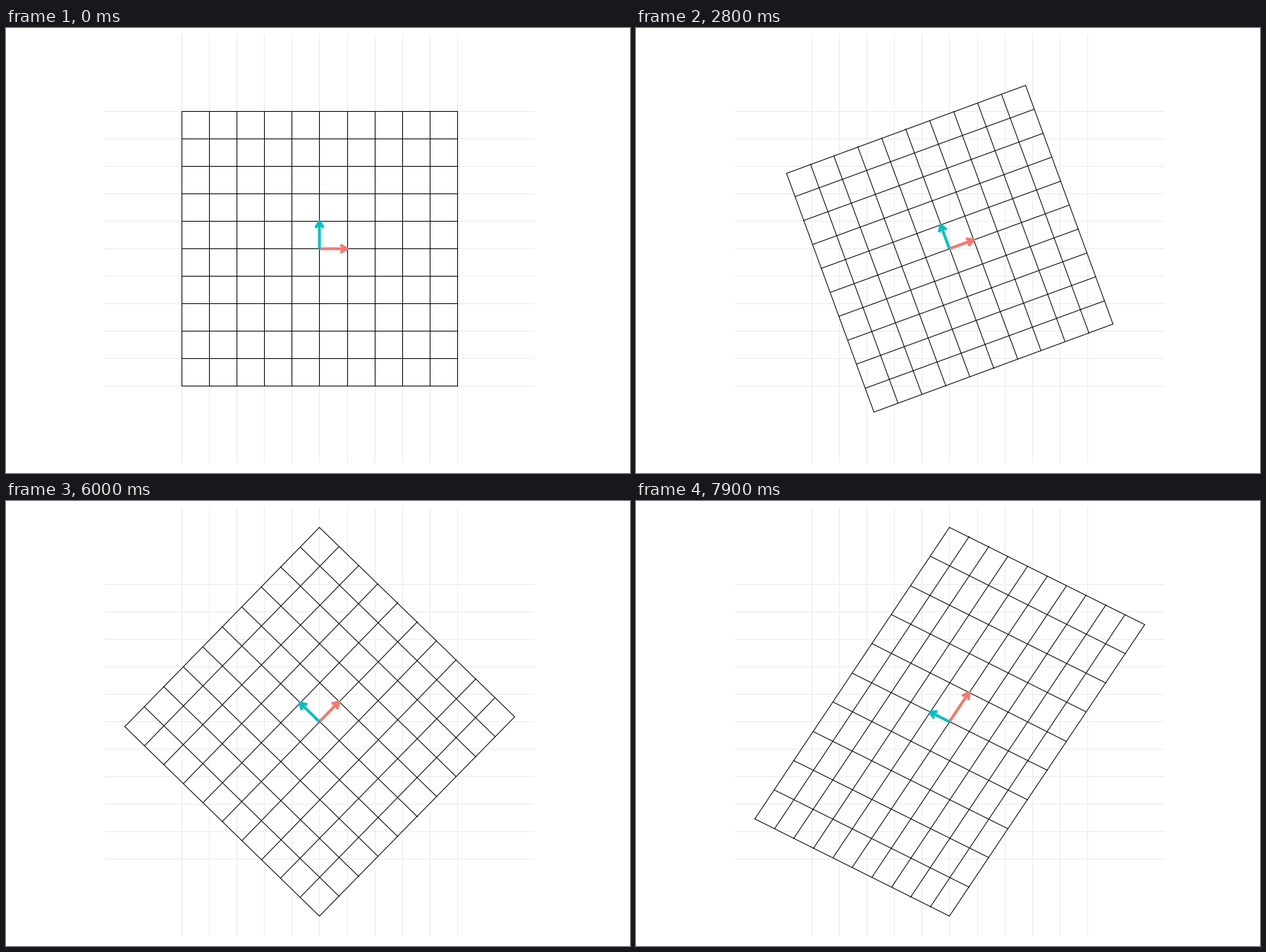
These frames come from a looping animation (885 by 632 pixels, 10000 ms). A matplotlib script:

```python
import numpy as np
import matplotlib.pyplot as plt
from matplotlib.animation import FuncAnimation
from matplotlib.collections import LineCollection

W, H, DPI = 885, 632, 100
FRAMES, INTERVAL = 100, 100
CENTER = np.array([444.5, 313.5])
NUDGE = np.array([0.45, 0])
UNIT = 39.08
STEPS = 20
HEAD = 10.8

# Columns are the images of the two basis vectors.
IDENTITY = np.eye(2)
R = np.sqrt(0.5)
ROTATED = np.array([[R, -R], [R, R]])
SHEARED = np.array([[1, 0], [0.5, 1]]) @ ROTATED


def px(width):
    return width * 72 / DPI


def to_stage(points):
    return CENTER + np.asarray(points) * [UNIT, -UNIT]


def to_pixels(points):
    """Stage points moved to the middle of their pixel."""
    return np.floor(to_stage(points) + NUDGE) + 0.5


def grid_lines(reach):
    lines = []
    for k in range(-5, 6):
        lines.append([(-reach, k), (reach, k)])
        lines.append([(k, -reach), (k, reach)])
    return np.array(lines, float)


def matrix_at(frame):
    if frame < 60:
        start, end, first = IDENTITY, ROTATED, 20
    else:
        start, end, first = ROTATED, SHEARED, 60
    t = np.clip((frame - first + 1) / STEPS, 0, 1)
    return (1 - t) * start + t * end


def head_points(vector):
    tip = to_stage(vector)
    back = (CENTER - tip) / np.hypot(*(CENTER - tip))
    side = np.array([-back[1], back[0]])
    base = tip + back * HEAD * np.cos(np.pi / 6)
    wing = side * HEAD / 2
    return np.array([base + wing, tip, base - wing])


fig = plt.figure(figsize=(W / DPI, H / DPI), dpi=DPI, facecolor="white")
ax = fig.add_axes([0, 0, 1, 1])
ax.set_xlim(0, W)
ax.set_ylim(H, 0)
ax.axis("off")

GRID = grid_lines(5)


def add_lines(color, zorder):
    lines = LineCollection([], colors=color, linewidths=px(1.05),
                           capstyle="projecting", zorder=zorder)
    lines.set_snap(False)
    ax.add_collection(lines, autolim=False)
    return lines


def add_stroke(color):
    line, = ax.plot([], [], color=color, lw=px(4), zorder=3,
                    solid_capstyle="butt", solid_joinstyle="round")
    line.set_snap(False)
    return line


backdrop = add_lines("#EBEBEB", 1)
backdrop.set_segments(to_pixels(grid_lines(5 * np.sqrt(2) * 1.1)))
mesh = add_lines("black", 2)
arrows = [(add_stroke(c), add_stroke(c)) for c in ("#F8766D", "#00BFC4")]


def draw(frame):
    matrix = matrix_at(frame)
    mesh.set_segments(to_pixels(GRID @ matrix.T))
    for vector, (shaft, head) in zip(matrix.T, arrows):
        shaft.set_data(*np.array([CENTER, to_stage(vector)]).T)
        head.set_data(*head_points(vector).T)
    return [mesh] + [stroke for pair in arrows for stroke in pair]


anim = FuncAnimation(fig, draw, frames=FRAMES, interval=INTERVAL,
                     repeat=True, repeat_delay=0, blit=False)
plt.show()
```
